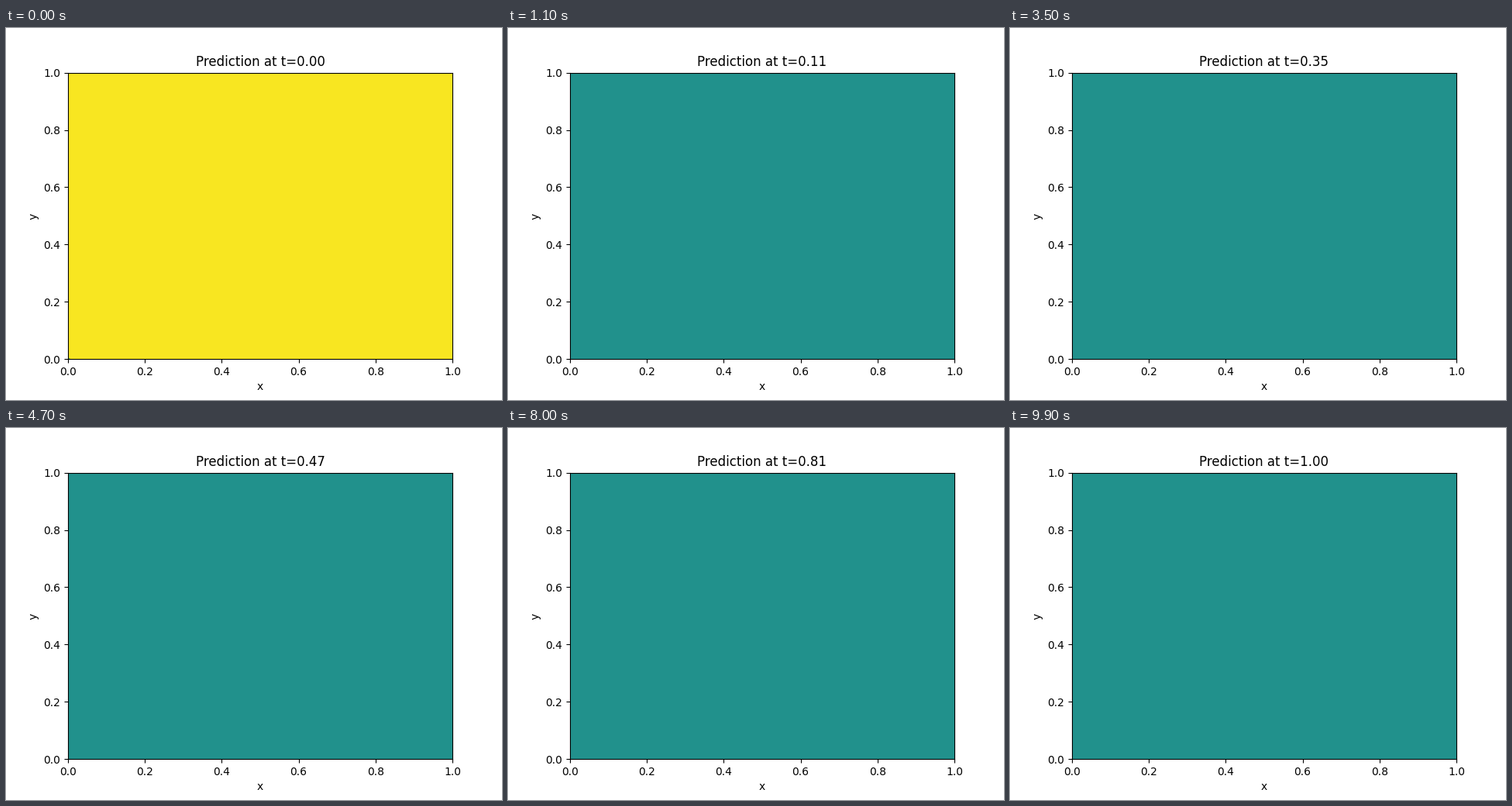
A matplotlib script for the animation above (10 s loop, 640 by 480 pixels).

```python
import matplotlib.pyplot as plt
import numpy as np
from matplotlib.animation import FuncAnimation

STEPS = 100
times = np.linspace(0, 1, STEPS)

fig, ax = plt.subplots(figsize=(6.4, 4.8), dpi=100)
cmap = plt.get_cmap("viridis")
ax.set_facecolor(cmap(0.5))  # the field is uniform once time starts

# Initial state: one everywhere except at the origin corner.
axis = np.linspace(0, 1, 100)
start = np.ones((axis.size, axis.size))
start[0, 0] = 0
field = ax.contourf(axis, axis, start, levels=50, cmap=cmap)

ax.set(xlim=(0, 1), ylim=(0, 1), xlabel="x", ylabel="y")
title = ax.set_title("")


def update(i):
    field.set_visible(i == 0)
    title.set_text(f"Prediction at t={times[i]:.2f}")
    return field, title


anim = FuncAnimation(fig, update, frames=STEPS, interval=100,
                     repeat=True, repeat_delay=0)
plt.show()
```
